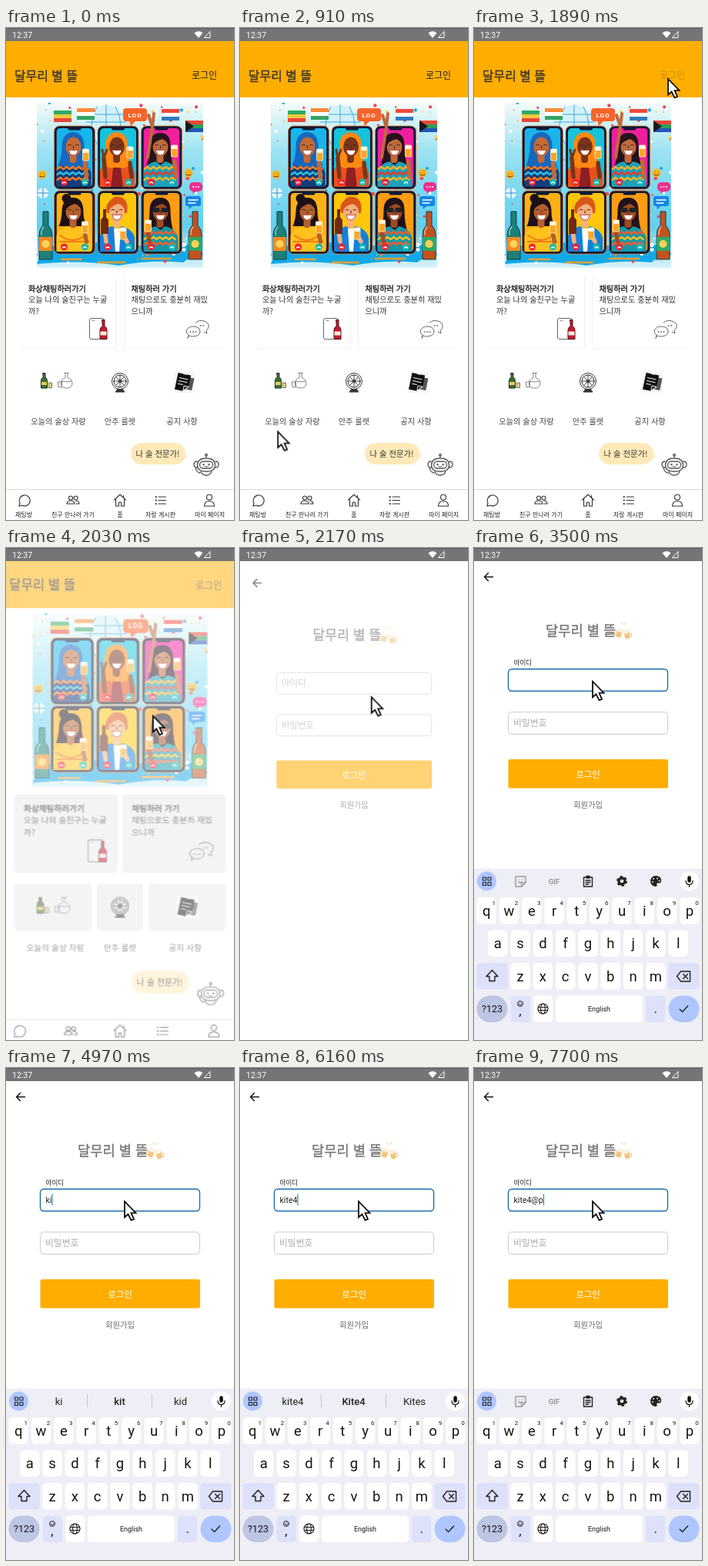
These frames come from a looping animation (296 px wide and 638 px high, 8 s). An HTML page:

```html
<!DOCTYPE html>
<html lang="ko">
<head>
<meta charset="utf-8">
<title>로그인 화면</title>
<style>
html, body { margin: 0; width: 100%; height: 100%; overflow: hidden; background: #fff; }
svg { display: block; font-family: "Noto Sans CJK KR", "Noto Sans CJK", "Noto Sans KR", sans-serif; }
#stage { width: 296px; height: 638px; }
.latin { font-family: Roboto, sans-serif; }
.mid { text-anchor: middle; }
.line { fill: none; stroke-linecap: round; stroke-linejoin: round; }
.bold { fill: currentColor; stroke: currentColor; stroke-width: .35; }
#home, #login, #keyboard, #pointer, .ring, .shade, #navLabels, #signIn { animation: 8s linear infinite; }
#home { animation-name: leave; transform-origin: 148px 337px; }
#login { animation-name: enter; transform-origin: 148px 327px; }
#keyboard { animation-name: rise; }
#pointer { animation-name: roam; }
.shade { animation-name: shade; fill: #e8e8e8; }
#navLabels { animation-name: unlabel; }
#signIn { animation-name: press; }
.ring { fill: none; stroke: #000; stroke-width: 1.4; }
#ring1 { animation-name: tap1; transform-origin: 250px 63px; }
#ring2 { animation-name: tap2; transform-origin: 152px 170px; }
@keyframes leave {
  0%, 24% { transform: none; opacity: 1; }
  25.375% { transform: scale(1.05); opacity: .5; }
  27%, 100% { transform: scale(1.1); opacity: 0; }
}
@keyframes enter {
  0%, 25.5% { transform: scale(.94); opacity: 0; }
  28.5%, 100% { transform: none; opacity: 1; }
}
@keyframes rise {
  0%, 36% { transform: translateY(224px); animation-timing-function: ease-out; }
  40.25%, 100% { transform: none; }
}
@keyframes roam {
  0%, .8% { transform: translate(175px, 650px); animation-timing-function: ease-in-out; }
  4.4% { transform: translate(257px, 42px); animation-timing-function: ease-in-out; }
  10.5%, 11.3% { transform: translate(49px, 524px); animation-timing-function: ease-in-out; }
  15% { transform: translate(279px, 22px); animation-timing-function: ease-in-out; }
  17.5%, 24% { transform: translate(252px, 66px); }
  25.375% { transform: translate(191px, 218px); animation-timing-function: ease-out; }
  30%, 100% { transform: translate(154px, 173px); }
}
@keyframes shade { 0% { opacity: 0; animation-timing-function: step-end; } 24%, 100% { opacity: 1; } }
@keyframes unlabel { 0% { opacity: 1; animation-timing-function: step-end; } 24%, 100% { opacity: 0; } }
@keyframes press {
  0% { opacity: 1; animation-timing-function: step-end; }
  20.125% { opacity: .25; animation-timing-function: step-end; }
  24%, 100% { opacity: .75; }
}
@keyframes tap1 {
  0% { opacity: 0; transform: scale(.4); animation-timing-function: step-end; }
  20.125% { opacity: 1; transform: scale(.4); }
  21.875% { opacity: 1; transform: none; animation-timing-function: step-end; }
  22.75%, 100% { opacity: 0; transform: none; }
}
@keyframes tap2 {
  0% { opacity: 0; transform: scale(.4); animation-timing-function: step-end; }
  33.25% { opacity: 1; transform: scale(.4); }
  35% { opacity: 1; transform: none; animation-timing-function: step-end; }
  36.75%, 100% { opacity: 0; transform: none; }
}
.field { fill: #fff; stroke: #ccc; }
#idLabel, #caret { visibility: hidden; }
.focused #idField { stroke: #1a6fae; stroke-width: 1.4; }
.focused #idLabel { visibility: visible; }
.focused #idHint { visibility: hidden; }
.shifted .letter { text-transform: uppercase; }
.shifted #shift { fill: #222; }
.shifted #face { visibility: hidden; }
</style>
</head>
<body>
<svg id="stage" viewBox="0 0 296 638">
  <defs>
    <linearGradient id="sky" x2="0" y2="1">
      <stop stop-color="#f4fbf8"/><stop offset=".3" stop-color="#9be2f3"/>
      <stop offset=".75" stop-color="#5fd0f0"/><stop offset="1" stop-color="#d8f3fa"/>
    </linearGradient>
  </defs>
  <rect width="296" height="638" fill="#fff"/>

  <g id="home">
    <rect y="17" width="296" height="73" fill="#ffae00"/>
    <text x="11" y="67.5" font-size="15.9" class="bold" color="#3d3630">달무리 별 뜰</text>
    <text id="signIn" x="241" y="66" font-size="12" fill="#222">로그인</text>
    <svg id="art" x="40" y="97" width="216" height="214" viewBox="40 97 216 214"></svg>

    <path d="M20 415.5H143.5V322M153.5 322V415.5H277" fill="none" stroke="#f0f0f0"/>
    <g id="shades"></g>
    <g font-size="10.2" fill="#333">
      <text x="29" y="341.5" class="bold" color="#222">화상채팅하러가기</text>
      <text x="29" y="355.7">오늘 나의 술친구는 누굴</text>
      <text x="29" y="370.5">까?</text>
      <text x="162.5" y="341.5" class="bold" color="#222">채팅하러 가기</text>
      <text x="162.5" y="355.7">채팅으로도 충분히 재밌</text>
      <text x="162.5" y="370.5">으니까</text>
    </g>
    <g class="line" stroke="#666">
      <path d="M121 403.500H111q-2.500 0-2.500-2.500V379q0-2.500 2.500-2.500h14q2.500 0 2.500 2.500"/>
      <path d="M112 379.500h3" stroke="#999"/>
      <path d="M125 378.500h3v8q3 2 3 5v12h-9v-12q0-3 3-5z" fill="#c9182c" stroke="#4a161c"/>
      <path d="M122.500 393.500h8v5h-8z" fill="#f8e9e4" stroke="none"/>
      <path d="M246 382q5-4 11-2q7 2 6 8q-1 3-3 4l1 4-4-2M236 402l1-4q-3-2-3-5q2-6 9-6q9 0 9 7q-1 6-10 6q-3 0-4-1z"/>
      <path d="M239.500 394h0M243 394h0M246.500 394h0M252.500 386h0M256 386h0" stroke-width="1.8"/>
    </g>

    <g class="line">
      <path d="M48 447.500h3v5q2.500 2 2.500 5v9.500h-8v-9.500q0-3 2.500-5z" fill="#3d6b31" stroke="#26361f"/>
      <path d="M46 459h7v4h-7z" fill="#dfd05c"/>
      <path d="M55.500 460h4v6.500h-4z" fill="#e3cd78" stroke="#555" stroke-width=".8"/>
      <path d="M75.500 447.500h6M77 447.500v6q-5.500 2-5.500 7.500q0 6 7 6t7.500-6q0-5.500-6-7.500v-6M67.500 459h5v6.500h-4zM72 458q7 2 13 0" stroke="#777" stroke-width=".9"/>
    </g>
    <g id="wheel" class="line" stroke="#333" transform="translate(148 458)"></g>
    <path d="M218 446h27v27h-27z" fill="#f6f6f6"/>
    <g class="line" stroke="#eee" transform="rotate(12 232 460)">
      <path d="M226 452h17v16h-17z" fill="#555" stroke="none"/>
      <path d="M221 449h17v15l-6 7h-11z" fill="#111" stroke="none"/>
      <path d="M232 471v-7h6zM224 455h11M224 459h11M224 463h6M228 449h4"/>
    </g>
    <g class="mid" font-size="10.2" fill="#444">
      <text x="68" y="513.7">오늘의 술상 자랑</text>
      <text x="148" y="513.7">안주 룰렛</text>
      <text x="228.5" y="513.7">공지 사항</text>
    </g>

    <rect x="162" y="538" width="71" height="28" rx="14" fill="#fee9b8"/>
    <path d="M229 550l7 5-8 5z" fill="#fee9b8"/>
    <text x="197" y="556.3" font-size="10.4" class="mid" fill="#333">나 술 전문가!</text>
    <g class="line" stroke="#555" stroke-width="1.3">
      <path d="M248.500 567q0-9 11.500-9t11.500 9q0 8-11.500 8t-11.500-8zM260 558v-3M248 562q-4 0-4 4t4 4M272 562q4 0 4 4t-4 4M253 575q2 5 7 5t7-5M246 570q1 6 6 7"/>
      <rect x="251.500" y="562" width="17" height="9" rx="4.500"/>
      <circle cx="260" cy="553.800" r="1.300"/>
      <path d="M256.500 566h0M263.500 566h0" stroke-width="2.400"/>
      <path d="M258 568.500q2 1.200 4 0" stroke-width="1"/>
    </g>

    <path d="M0 598.500H296" stroke="#d8d8d8"/>
    <g class="line" stroke="#333" stroke-width="1.1">
      <path d="M17 620l1-4a7 7 0 1 1 3 3z"/>
      <circle cx="84" cy="609.500" r="2.500"/><circle cx="90.500" cy="609.500" r="2.500"/>
      <path d="M79 617q0-4 5-4t5 4zM91 617h4q0-4-4.500-4"/>
      <path d="M140.500 612l7.500-7 7.500 7M142.500 611v9h4v-5h3v5h4v-9M152.500 606v3"/>
      <path d="M198 608h9.500M198 612.500h9.500M198 617h9.500"/>
      <path d="M194.500 608h.5M194.500 612.500h.5M194.500 617h.5" stroke-width="1.8"/>
      <circle cx="264" cy="608.500" r="3.500"/>
      <path d="M257.500 620q0-6.500 6.500-6.500t6.500 6.500z"/>
    </g>
    <g id="navLabels" class="mid" font-size="8" fill="#222">
      <text x="23" y="633.8">채팅방</text>
      <text x="87" y="633.8">친구 만나러 가기</text>
      <text x="148" y="633.8">홈</text>
      <text x="200.5" y="633.8">자랑 게시판</text>
      <text x="264.5" y="633.8">마이 페이지</text>
    </g>
  </g>

  <g id="login">
    <rect y="17" width="296" height="621" fill="#fff"/>
    <path class="line" d="M24.500 37.500H13.500M18.500 32.500l-5 5 5 5" stroke="#111" stroke-width="1.5"/>
    <text x="93" y="113.5" font-size="17.7" class="bold" color="#757575">달무리 별 뜰</text>
    <g id="mugs" opacity=".7"></g>
    <rect id="idField" class="field" x="44.5" y="157" width="207" height="28.5" rx="4.5"/>
    <text id="idLabel" x="51.5" y="152" font-size="8.6" fill="#222">아이디</text>
    <text id="idHint" x="51" y="175.3" font-size="12" fill="#aaa">아이디</text>
    <text id="typed" class="latin" x="51.5" y="174.5" font-size="10.6" fill="#222"></text>
    <path id="caret" d="M0 163.500v14.500" stroke="#2d9a9c" stroke-width="1.3"/>
    <rect class="field" x="44.5" y="212.8" width="207" height="28.5" rx="4.5"/>
    <text x="51" y="231.3" font-size="11.8" fill="#aaa">비밀번호</text>
    <rect x="44.5" y="274" width="207.5" height="37.5" rx="2.5" fill="#ffae00"/>
    <text x="148" y="298" font-size="11.5" class="mid" fill="#fff">로그인</text>
    <text x="148" y="337" font-size="10.3" class="mid" fill="#666">회원가입</text>
  </g>

  <g id="keyboard">
    <rect y="415.5" width="296" height="223" fill="#eeeef6"/>
    <circle cx="16.5" cy="432" r="12.5" fill="#afc6ff"/>
    <path class="line" d="M11.500 427h4v4h-4zM18 427h4v4h-4zM11.500 433.500h4v4h-4zM18 433.500h4v4h-4z" stroke="#223" stroke-width="1.2"/>
    <circle cx="279.5" cy="432" r="12.5" fill="#fff"/>
    <path d="M279.500 427.500v4" stroke="#111" stroke-width="4.5" stroke-linecap="round"/>
    <path class="line" d="M275 431.500q0 5 4.500 5t4.500-5M279.500 437v2.500" stroke="#111" stroke-width="1.2"/>
    <g id="tools">
      <path class="line" d="M54 426h13v8l-5 5h-8zM62 439v-5h5M58 430h0M63 430h0M58 433q2 2 4 0" stroke="#999" stroke-width="1.4"/>
      <text x="104" y="435.8" font-size="9.5" font-weight="700" class="latin mid" fill="#999">GIF</text>
      <path class="line" d="M142.500 427h11v12h-11zM146 425.500h4v2.500h-4zM145 431h6M145 433.500h6M145 436h4" stroke="#222" stroke-width="1.4"/>
      <circle cx="192" cy="432" r="4" fill="none" stroke="#222" stroke-width="3.3"/>
      <circle cx="192" cy="432" r="6" fill="none" stroke="#222" stroke-width="2" stroke-dasharray="3.14"/>
      <path d="M236 425a7 7 0 1 0 0 14q2 0 1.500-2-1-2 1-2.500h2q2.500 0 2.500-3 0-6.500-7-6.500z" fill="#222"/>
      <path class="line" d="M232 433h0M233 429h0M238 428.500h0M240.500 431.500h0" stroke="#eeeef6" stroke-width="2"/>
    </g>
    <g id="suggest" class="latin mid" font-size="13" fill="#222">
      <path d="M105.500 423v17M189.500 423v17" stroke="#c4c4cc"/>
      <text x="68.5" y="436.5"></text>
      <text x="147.5" y="436.5" font-weight="500"></text>
      <text x="226.5" y="436.5"></text>
    </g>
    <g id="keys" class="latin mid" fill="#151515"></g>
    <g class="line" stroke="#222" stroke-width="1.4">
      <path id="shift" d="M23.500 547.500l7.500 8h-4v6h-7v-6h-4z"/>
      <path d="M263.500 555.500l5-6.500h12v13h-12zM271.500 552.500l6 6M277.500 552.500l-6 6M267 598l3.500 3.500 7-7.500"/>
      <g id="face" stroke-width="1"><circle cx="60" cy="591" r="3.5"/><path d="M58.500 590h0M61.500 590h0M58.300 592q1.700 1.500 3.400 0"/></g>
      <g stroke-width="1.2"><circle cx="89.5" cy="597.5" r="6.5"/><ellipse cx="89.5" cy="597.5" rx="2.8" ry="6.5"/><path d="M83.500 595.500h12M83.500 599.500h12"/></g>
    </g>
  </g>

  <rect width="296" height="17" fill="#757575"/>
  <path d="M0 .5H296" stroke="#5c5c5c"/>
  <text class="latin" x="8" y="12.7" font-size="10.5" fill="#fff">12:37</text>
  <path d="M244.500 6.500q5.500-4.500 11 0L250 13z" fill="#fff"/>
  <path d="M257.500 12.500h7.500V4.500z" fill="none" stroke="#fff"/>
  <circle id="ring1" class="ring" cx="250" cy="63" r="30.3"/>
  <circle id="ring2" class="ring" cx="152" cy="170" r="30.3"/>
  <path id="pointer" d="M0 0V20.500L4.500 16.500L8.500 24.500L12 23L8.500 15H14.500Z" fill="#fff" stroke="#000" stroke-width="1.7"/>
</svg>

<script>
const $ = id => document.getElementById(id);
const rect = (x, y, w, h, r, fill, extra = '') =>
  `<rect x="${x}" y="${y}" width="${w}" height="${h}" rx="${r}" fill="${fill}" ${extra}/>`;
const dot = (x, y, r, fill) => `<circle cx="${x}" cy="${y}" r="${r}" fill="${fill}"/>`;
const path = (d, fill, extra = '') => `<path d="${d}" fill="${fill}" ${extra}/>`;
const stroke = (d, color, w = 1) =>
  path(d, 'none', `stroke="${color}" stroke-width="${w}" stroke-linecap="round"`);
const move = (x, y, body) => `<g transform="translate(${x} ${y})">${body}</g>`;
const label = (x, y, size, text, cls = '') =>
  `<text x="${x}" y="${y}" font-size="${size}" class="${cls}">${text}</text>`;

// Illustration: six video-call phones
const hair = {
  scarf: c => path('M25 8q-15 1-15 19q0 14-5 24q20 10 40 0q-6-9-6-24q0-18-14-19z', c),
  long: c => path('M25 9q-14 0-14 17q0 16-6 31h38q-5-15-5-31q0-17-13-17z', c),
  bun: c => dot(16, 10, 6, c) + path('M25 9q-15 0-15 19q-1 12-4 18h37q-5-8-5-18q0-19-13-19z', c),
  short: c => path('M12 29q-3-10 4-16q4-6 12-5q13 2 10 21z', c)
};
const head = (skin, fringe) =>
  rect(20, 34, 9, 14, 4, skin) +
  `<ellipse cx="25" cy="27" rx="10" ry="12.5" fill="${skin}"/>` +
  (fringe ? path('M14 27q0-15 11-15t11 14q-3-7-9-9q-9 2-13 10z', fringe) : '') +
  stroke('M18 25q2-2 4 0M28 25q2-2 4 0M25 26v3', '#3a2020', 1) +
  path('M19 31q6 1 12 0q-1 7-6 7t-6-7z', '#fff', 'stroke="#9c2f24" stroke-width=".8"');
const beer = (x, y) => move(x, y,
  rect(0, 0, 8, 15, 1, '#f7a62a', 'stroke="#fff0d0" stroke-width=".8"') + rect(0, 0, 8, 5, 2, '#fff6e0'));

function phone([bg, skin, style, hairColor, cloth, extra], i) {
  const person = hair[style](hairColor) +
    path('M2 82V61q3-12 17-15l6 5 6-5q14 3 17 15v21z', cloth) +
    (style == 'scarf' ? path('M13 38q12 12 24 0l5 13q-17 9-34 0z', hairColor) : '') +
    head(skin, style == 'scarf' ? '' : hairColor) + extra;
  return move(62.5 + 56.5 * (i % 3), i < 3 ? 127 : 211,
    rect(0, 0, 53, 82, 7, '#0d1836', 'stroke="#f07a28" stroke-width=".8"') +
    `<svg x="3" y="3" width="47" height="76" viewBox="3 3 47 76">${rect(3, 3, 47, 76, 5, bg)}${person}</svg>` +
    rect(18, 2, 17, 3.5, 2, '#0d1836') +
    dot(13, 73, 4.5, '#f5222e') + dot(40, 73, 4.5, '#14b8b4') +
    stroke('M11 74q2-2 4 0M38 74q2-2 4 0', '#fff', 1.3));
}
const arm = (skin, x, y) => stroke(`M${x + 2} 66L${x} ${y}`, skin, 5.5);
const zigzag = (a, b) => [0, 7, 14].map((y, i) =>
  stroke(`M4 ${56 + y}l4-3 4 3 4-3 4 3 4-3 4 3 4-3 4 3 4-3 4 3`, i % 2 ? b : a, 2.4)).join('');
const people = [
  ['#19b4ea', '#c56a35', 'scarf', '#1767bd', '#163c7c', zigzag('#ff7a1f', '#29c3e0') + arm('#c56a35', 40, 48) + beer(37, 30)],
  ['#16c3da', '#7a3519', 'scarf', '#ff8a12', '#e8501d',
    path('M20 54h10l3 26H17z', '#8e1f24') + arm('#7a3519', 8, 42) + stroke('M8 42l-2-11M8 42l4-11', '#7a3519', 3) + arm('#7a3519', 42, 48) + beer(38, 27)],
  ['#f01f9b', '#bf6a3c', 'long', '#26121c', '#1f9fb8', zigzag('#ffb41f', '#e43b2f') + arm('#bf6a3c', 43, 46) + beer(39, 25)],
  ['#ffb012', '#b5602d', 'bun', '#1d1018', '#ffc21c', stroke('M8 58q16 12 32 0M7 66h38', '#f07a18', 2) + arm('#b5602d', 40, 56) + beer(36, 40)],
  ['#ffc60a', '#f8b07c', 'short', '#d9571a', '#1580dc',
    path('M21 49h9l-2 31h-5z', '#fff') + arm('#f8b07c', 9, 50) + path('M7 24h4v10l3 4v18H4V38l3-4z', '#6d2a16') + arm('#f8b07c', 36, 62) + beer(29, 48)],
  ['#ff9c12', '#9c4c23', 'long', '#21121b', '#1597a8',
    rect(15, 22, 9, 6, 2, '#222') + rect(26, 22, 9, 6, 2, '#222') + zigzag('#ff5a2a', '#ffc21c') + arm('#9c4c23', 9, 56) + beer(5, 38)]
];
const flag = (x, y, colors) => colors.map((c, i) => rect(x, y + i * 5, 23, 5, 0, c)).join('');
const bottle = (x, glass, tag) => move(x, 238,
  path('M5 0h7v18q5 5 5 12v32h-17V30q0-7 5-12z', glass, 'stroke="#143c46"') +
  rect(0, 33, 17, 18, 0, tag) + dot(8.5, 42, 5, '#ffd35c') + stroke('M3 30v-3q0-4 3-7', '#ffffff90', 1.5));
const smiley = (x, y) => dot(x, y, 5.5, '#ffb81e') +
  stroke(`M${x - 2} ${y - 1}h0M${x + 2} ${y - 1}h0M${x - 3} ${y + 2}q3 2 6 0`, '#6b3d12', 1.2);

let seed = 7;
const rand = () => (seed = seed * 16807 % 2147483647) / 2147483647;
const pick = list => list[Math.floor(rand() * list.length)];
const confetti = [...Array(130)].map(() =>
  dot(40 + rand() * 216, 97 + rand() * 214, .6 + rand() * 2, pick(['#ff8a1f', '#19a8e0', '#ffd04a', '#f0485a', '#fff', '#fff']))).join('');
const raisedHand = stroke('M184 168L190 128M190 128l-5-15M190 128l2-17', '#bf6a3c', 4);

$('art').innerHTML =
  rect(40, 97, 216, 214, 0, 'url(#sky)') +
  path('M48 286q40-12 100-6t100 0l8 14q-20 4-26 10-40-4-84 4-50-8-106-2z', '#13a9e6') + confetti +
  dot(130, 126, 26, '#d3f1f8') +
  stroke('M104 122h52M130 100v52M118 102q-14 24 0 48M142 102q14 24 0 48M108 112h44', '#3fa9d8') +
  flag(62, 107, ['#2fa866', '#f5c740', '#e8473c']) +
  flag(92, 104, ['#ff8a35', '#fff', '#33a562']) +
  flag(202, 105, ['#f0493c', '#fff', '#317dc1']) +
  flag(233, 120, ['#e8483a', '#2da060', '#2456b6']) +
  path('M233 120l11 7.5-11 7.5z', '#181818') +
  rect(152, 104, 31, 17, 4, '#f8642a') + path('M160 120h9l-7 7z', '#f8642a') +
  `<text x="167.5" y="115.5" font-size="8" font-weight="700" letter-spacing="1" class="latin mid" fill="#fff">LOO</text>` +
  smiley(47, 190) + smiley(237, 188) + dot(48, 214, 7, '#e3f7fb') +
  stroke('M41 214h14M48 207v14', '#338fc5') +
  rect(238, 200, 17, 12, 5, '#f02f8c') + path('M242 211h5l-4 4z', '#f02f8c') +
  stroke('M243 206h0M246.5 206h0M250 206h0', '#fff', 2) +
  rect(233, 218, 20, 13, 3, '#1687e6') + path('M237 230h6l-5 5z', '#1687e6') +
  stroke('M237 223h12M237 227h9', '#fff', 1.3) +
  people.map(phone).join('') + raisedHand +
  bottle(43, '#1e7f78', '#f58a1f') + bottle(237, '#c2521f', '#2fa866') +
  stroke('M72 300h26M120 304h34M176 299h38', '#ff9d2b', 2.5);

// Home tiles
$('shades').innerHTML = [
  [17.5, 320, 127.5, 97], [151, 320, 127.5, 97],
  [17.5, 431, 95.5, 57.5], [119.5, 431, 57, 57.5], [183.5, 431, 95, 57.5]
].map(([x, y, w, h]) => rect(x, y, w, h, 4, '#e8e8e8', 'class="shade"')).join('');
$('wheel').innerHTML = '<circle r="10.5"/><circle r="8"/><circle r="2"/>' +
  [0, 45, 90, 135].map(a => `<path d="M-8 0H8" transform="rotate(${a})" stroke-width=".9"/>`).join('') +
  '<path d="M-3 10l-3 4h12l-3-4" fill="#333"/>';

const mug = rect(0, 0, 7, 9, 1, '#f3b545') + rect(-.5, -2, 8, 4, 2, '#fff0cf', 'stroke="#dcc79c" stroke-width=".5"') +
  stroke('M0 3h-2v4h2M2.5 4v4M4.8 4v4', '#d9a558');
$('mugs').innerHTML =
  `<g transform="translate(186 106) rotate(16)">${mug}</g>` +
  `<g transform="translate(201 108) scale(-1 1) rotate(16)">${mug}</g>` +
  stroke('M192 99l-1-2M195 99l2-2', '#e6a84a');

// Keyboard
const key = (cx, y, ch, hint = '') => rect(cx - 12.7, y, 25.4, 34.5, 5, '#fff') +
  label(cx, y + 23.5, 18.5, ch, 'letter') + (hint && label(cx + 9.5, y + 10, 8, hint));
const row = (chars, x, y, hints = '') =>
  [...chars].map((c, i) => key(x + 29.3 * i, y, c, hints[i])).join('');
const pale = '#dde1f9';
$('keys').innerHTML =
  row('qwertyuiop', 16.2, 453, '1234567890') + row('asdfghjkl', 30.8, 495.5) +
  row('zxcvbnm', 60.1, 538) +
  rect(3.5, 538, 40.5, 34.5, 5, pale) + rect(252, 538, 40.5, 34.5, 5, pale) +
  rect(3.5, 580.5, 40, 34.5, 17, '#bdc6e2') + label(23.5, 602.3, 12.5, '?123') +
  rect(47.5, 580.5, 25.4, 34.5, 5, pale) + label(60, 605.5, 17, ',') +
  rect(77, 580.5, 25.4, 34.5, 5, '#fff') +
  rect(106, 580.5, 113, 34.5, 5, '#fff') + label(162.5, 601, 9, 'English') +
  rect(223, 580.5, 25.4, 34.5, 5, pale) + label(235.7, 603, 17, '.') +
  rect(252.5, 580.5, 40, 34.5, 17, '#afc6ff');

// Typing: [start, text, suggestions]
const typing = [
  [0, ''], [4200, 'k'],
  [4970, 'ki', ['ki', 'kit', 'kid']],
  [5110, 'kit', ['kit', 'kite', 'kits']],
  [5600, 'kite', ['kite', 'kites', 'Kite']],
  [6160, 'kite4', ['kite4', 'Kite4', 'Kites']],
  [6930, 'kite4@'], [7700, 'kite4@p']
];
const caretOff = [[0, 2940], [3500, 4060], [4760, 4970], [6720, 6930], [7490, 7700]];
const within = (t, [a, b]) => t >= a && t < b;
const words = $('suggest').querySelectorAll('text');
let start;

function draw(now) {
  start ??= now;
  const t = (now - start) % 8000;
  const [, text, list] = typing.findLast(([from]) => t >= from);
  $('typed').textContent = text;
  const end = 52 + (text ? $('typed').getComputedTextLength() : 0);
  $('caret').setAttribute('transform', `translate(${end} 0)`);
  $('caret').style.visibility = caretOff.some(span => within(t, span)) ? 'hidden' : 'visible';
  $('tools').style.visibility = list ? 'hidden' : 'visible';
  $('suggest').style.visibility = list ? 'visible' : 'hidden';
  words.forEach((w, i) => w.textContent = list ? list[i] : '');
  $('stage').classList.toggle('focused', t >= 2940);
  $('stage').classList.toggle('shifted', within(t, [6930, 7070]));
  requestAnimationFrame(draw);
}
requestAnimationFrame(draw);
</script>
</body>
</html>
```
